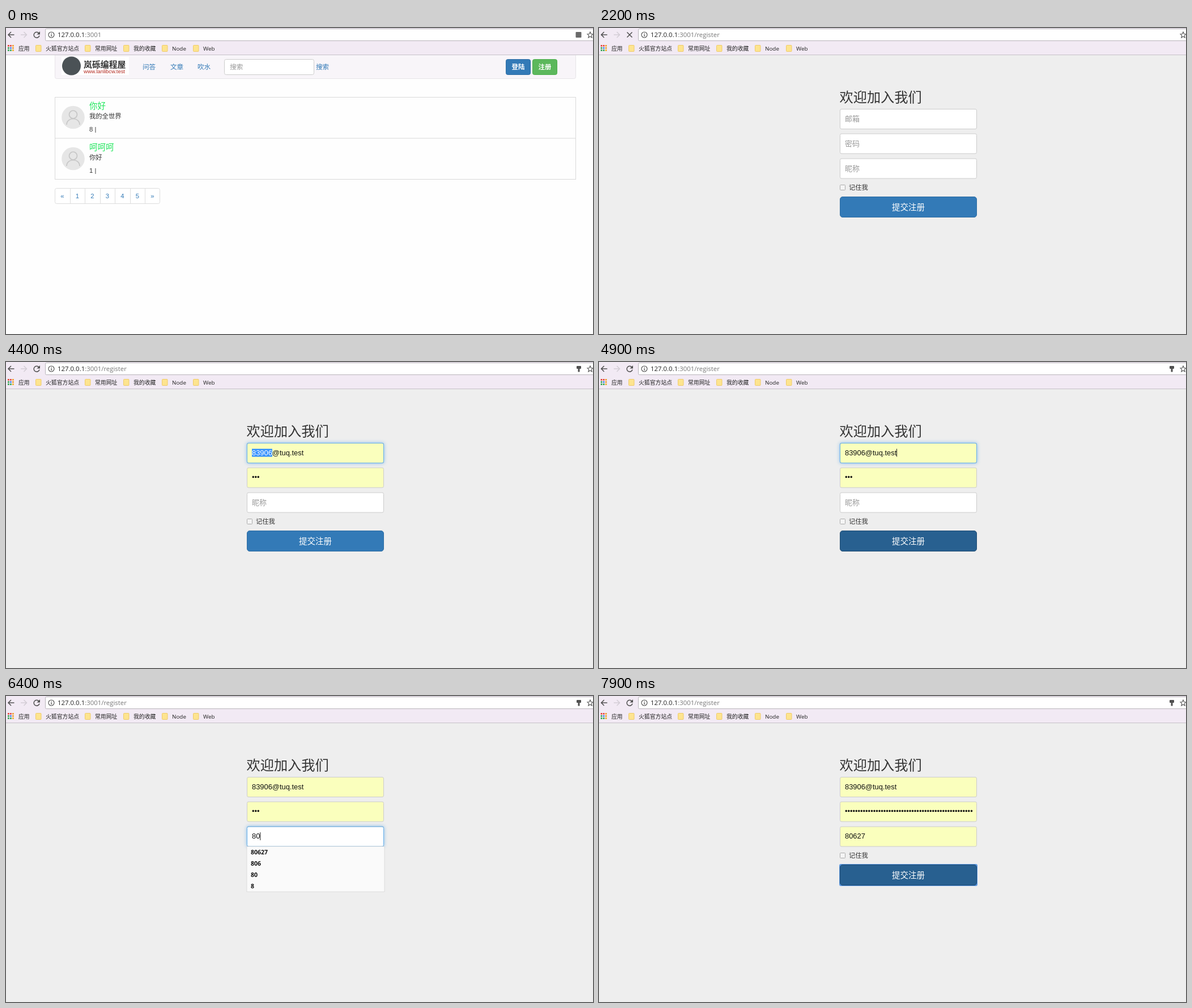
An HTML page for the animation above (8000 ms loop, 1036 by 541 pixels).

```html
<!DOCTYPE html>
<html lang="zh-CN">
<head>
<meta charset="utf-8">
<style>
  html, body { margin: 0; width: 100%; height: 100%; overflow: hidden; background: #fefefe; }
  svg { display: block; width: 1036px; height: 541px; }
  text { font-family: "Liberation Sans", "Noto Sans CJK SC", "Noto Sans CJK", sans-serif; white-space: pre; }
  .ui { font-family: "Open Sans", "Noto Sans CJK SC", "Noto Sans CJK", sans-serif; }
  .glow { filter: drop-shadow(0 0 3px rgba(102, 175, 233, .8)); }
</style>
</head>
<body>
<svg id="stage" viewBox="0 0 1036 541"></svg>
<script>
const LOOP = 8000;
const BLUE = '#337ab7', YELLOW = '#faffbd', FOCUS = '#66afe9';
const EMAIL = '83906@tuq.test', NICK = '80627';
const FIELD = { x: 425, w: 242, h: 36, size: 12.9, digit: 7.17 };

const rect = (x, y, w, h, fill, extra = '') =>
  `<rect x="${x}" y="${y}" width="${w}" height="${h}" fill="${fill}" ${extra}/>`;
const box = (x, y, w, h, fill, stroke, r = 0, extra = '') =>
  rect(x + .5, y + .5, w - 1, h - 1, fill, `stroke="${stroke}" rx="${r}" ${extra}`);
const text = (x, y, size, fill, str, extra = '') =>
  `<text x="${x}" y="${y}" font-size="${size}" fill="${fill}" ${extra}>${str}</text>`;
const path = (d, stroke, width = 1.5, extra = '') =>
  `<path d="${d}" fill="none" stroke="${stroke}" stroke-width="${width}" ${extra}/>`;
const circle = (x, y, r, fill, extra = '') =>
  `<circle cx="${x}" cy="${y}" r="${r}" fill="${fill}" ${extra}/>`;
const MID = 'text-anchor="middle"', BOLD = 'font-weight="700"', UI = 'class="ui"';

const within = (t, a, b) => t >= a && t < b;
const ramp = (t, start) => Math.min(1, Math.max(0, (t - start) / 150));
const blink = (t, start) => Math.floor((t - start) / 500) % 2 === 0;

function browser(t) {
  const loading = within(t, 2000, 2400);
  let s = rect(0, 0, 1036, 47, '#f2eaf4') + rect(0, 47, 1036, 1, '#c6c1c8');
  s += box(69, 1, 980, 22, '#fff', '#b8b3ba', 2);
  s += path('M14.5 12H4.5M9 7L4 12L9 17', '#505050');
  s += path('M26 12H36M31.500 7L36.500 12L31.500 17', '#d3cdd5');
  s += loading
    ? path('M49.500 7.500L58.500 16.500M58.500 7.500L49.500 16.500', '#505050')
    : path('M58 9A5 5 0 1 0 59 13.500', '#505050') + '<path d="M60 6V11.500H54.500Z" fill="#505050"/>';
  s += circle(80, 12, 5, 'none', 'stroke="#555" stroke-width="1.2"') +
    rect(79.4, 11, 1.3, 4, '#555') + rect(79.4, 8.700, 1.3, 1.3, '#555');
  const route = t < 2000 ? '' : '/register';
  s += text(91, 16, 11.4, '#222', `127.0.0.1<tspan fill="#777">:3001${route}</tspan>`, UI);
  if (t < 2000) s += rect(1005.5, 7, 10, 10, '#6a6a6a', 'rx="1"');
  if (t >= 2400) s += rect(1007, 7, 8, 5, '#505050', 'rx="1"') + rect(1009.5, 12, 3, 5.5, '#505050');
  s += path('M1031 7L1032.500 10.500L1036 10.800L1033.400 13.200L1034.200 17L1031 15L1027.800 17L1028.600 13.200L1026 10.800L1029.500 10.500Z', '#555', 1.1);

  ['#e8453c', '#e8453c', '#f0a030', '#3aa757', '#4285f4', '#f0a030', '#3aa757', '#3aa757', '#f0b030']
    .forEach((c, i) => s += rect(3 + i % 3 * 4, 30 + Math.floor(i / 3) * 4, 2.800, 2.800, c));
  s += text(22, 39.5, 9.8, '#222', '应用', UI);
  [[52, '火狐官方站点'], [139, '常用网址'], [207, '我的收藏'], [275, 'Node'], [330, 'Web']].forEach(([x, name]) => {
    s += box(x, 30, 10.5, 12, '#fde48f', '#efcb6a', 1);
    s += text(x + 18, 39.5, 9.85, '#222', name, UI);
  });
  return s;
}

function post(y, title, body, count, underlined) {
  const green = '#20e65c';
  return circle(118.5, y + 36, 20.3, '#e6e6e6') +
    circle(118.5, y + 31, 7, 'none', 'stroke="#c6c6c6" stroke-width="1.7"') +
    path(`M107 ${y + 49}C107 ${y + 35} 130 ${y + 35} 130 ${y + 49}`, '#c6c6c6', 1.7) +
    text(147, y + 21, 14.5, green, title) +
    (underlined ? rect(147, y + 94 - 73 + .5, 44, 1, green) : '') +
    text(147, y + 38, 11.3, '#333', body) +
    text(147, y + 61, 11.3, '#333', `${count} |`);
}

function homePage(t) {
  let s = rect(0, 48, 1036, 493, '#fefefe');
  s += box(86, 45, 920, 45, '#f8f5f9', '#e7e4e8', 3) + rect(86, 45, 920, 2, '#f2eaf4') + rect(0, 47, 1036, 1, '#c6c1c8');
  s += rect(98, 51, 119, 32, '#fff') + circle(115.5, 67, 16.5, '#4b5256');
  s += text(137, 70, 14.9, '#333', '岚砾编程屋', BOLD);
  s += text(137, 80, 9.4, '#b3271e', 'www.lanlibcw.test');
  [[241, '问答'], [290, '文章'], [338, '吹水'], [547, '搜索']].forEach(([x, name]) => s += text(x, 72.5, 11.6, BLUE, name));
  s += box(385, 55, 159, 28, '#fff', '#ccc', 3) + text(395, 73, 11.8, '#999', '搜索');
  const hover = t >= 1800;
  s += box(882, 55, 44, 28, BLUE, '#2e6da4', 3) + text(904, 73, 11.4, '#fff', '登陆', `${MID} ${BOLD}`);
  s += box(929, 55, 44, 28, hover ? '#449d44' : '#5cb85c', hover ? '#398439' : '#4cae4c', 3) +
    text(951, 73, 11.4, '#fff', '注册', `${MID} ${BOLD}`);

  s += box(86, 122, 920, 146, '#fefefe', '#d9d9d9') + rect(86, 194.5, 920, 1, '#d9d9d9');
  s += post(122, '你好', '我的全世界', 8, false);
  s += post(195, '呵呵呵', '你好', 1, within(t, 1300, 1400));

  s += box(86, 283, 186, 28, '#fff', '#ddd', 3);
  ['«', 1, 2, 3, 4, 5, '»'].forEach((label, i) => {
    if (i) s += rect(Math.round(86 + i * 26.5), 283, 1, 28, '#ddd');
    s += text(99.3 + i * 26.5, 301, 11.3, BLUE, label, MID);
  });
  return s;
}

// value may be empty; selection is [first, last) in digits
function field(y, { value, hint, focus = 0, selection, caret }) {
  const { x, w, h, size, digit } = FIELD, left = x + 9;
  let s = '';
  if (focus) s += rect(x, y, w, h, FOCUS, `rx="3" class="glow" opacity="${focus}"`);
  s += box(x, y, w, h, value && value.filled ? YELLOW : '#fff', '#ccc', 2.5);
  if (focus) s += box(x, y, w, h, 'none', FOCUS, 2.5, `opacity="${focus}"`);
  let shown = value ? value.text : '';
  if (selection) {
    const [a, b] = selection;
    s += rect(left + a * digit, y + 10.5, (b - a) * digit, 14, '#3390ff');
    shown = `${shown.slice(0, a)}<tspan fill="#fff">${shown.slice(a, b)}</tspan>${shown.slice(b)}`;
  }
  s += shown ? text(left, y + 21.7, size, '#111', shown) : text(left, y + 22.3, 13, '#999', hint);
  if (caret !== undefined) s += rect(caret, y + 10.500, 1, 14, '#222');
  return s;
}

function suggestions(items, active) {
  let s = rect(425, 266, 243, items.length * 20, '#fafafa', 'stroke="#ccc" stroke-width=".6"');
  if (active) s += rect(425, 266, 243, 20, '#b9dff5');
  items.forEach((item, i) => s += text(432, 280 + i * 20, 10.5, '#111', item, `${UI} ${BOLD}`));
  return s;
}

function registerPage(t) {
  let s = rect(0, 48, 1036, 493, '#eee') + text(424.5, 130.5, 24.2, '#333', '欢迎加入我们');
  const filled = t >= 2300;

  const email = { hint: '邮箱', focus: ramp(t, 2200.1 + 50) - ramp(t, 5500) };
  if (!filled) email.focus = 0;
  if (filled) email.value = { text: EMAIL, filled };
  if (within(t, 4100, 4700)) email.selection = [Math.max(0, 3 - Math.floor((t - 4100) / 100)), 5];
  if ((within(t, 2300, 4100) && blink(t, 2200)) || (within(t, 4800, 5500) && blink(t, 4800))) email.caret = 525;
  s += field(143, email);

  const dots = '•'.repeat(t >= 7900 ? 50 : 3);
  s += field(186.5, { hint: '密码', value: filled && { text: dots, filled } });

  const typed = t < 6200 ? 0 : t < 6400 ? 1 : t < 6800 ? 2 : t < 7000 ? 3 : 5;
  const nick = { hint: '昵称', focus: ramp(t, 5450) - ramp(t, 7750) };
  if (t < 5500) nick.focus = 0;
  if (typed) nick.value = { text: NICK.slice(0, typed), filled: t >= 7000 };
  if (within(t, 7000, 7400)) nick.selection = [3, 5];
  else if (within(t, 5500, 7800) && (typed || blink(t, 5500))) nick.caret = 434 + typed * FIELD.digit;
  s += field(230.5, nick);

  s += box(425, 277, 10, 10, '#f4f4f4', '#aaa', 1) + text(441, 286, 11.3, '#333', '记住我');

  const hover = within(t, 4900, 5100) || t >= 7600, pressed = t >= 7800;
  if (pressed) s += rect(424, 297, 244, 39, '#5a97e0', 'rx="3"');
  s += box(425, 298, 242, 37, hover ? '#286090' : BLUE, hover ? '#204d74' : '#2e6da4', 4.5);
  s += text(546, 322, 14.5, '#fff', '提交注册', MID);

  if (within(t, 6300, 7400)) {
    const rows = t < 6500 ? 4 : t < 6800 ? 3 : 2;
    s += suggestions([NICK, '806', '80', '8'].slice(0, rows), t >= 7000);
  }
  return s;
}

const stage = document.getElementById('stage');
let shown = '';
function render(now) {
  const t = now % LOOP;
  const scene = browser(t) + (t < 2200 ? homePage(t) : registerPage(t));
  if (scene !== shown) stage.innerHTML = shown = scene;
  requestAnimationFrame(render);
}
render(performance.now());
</script>
</body>
</html>
```
